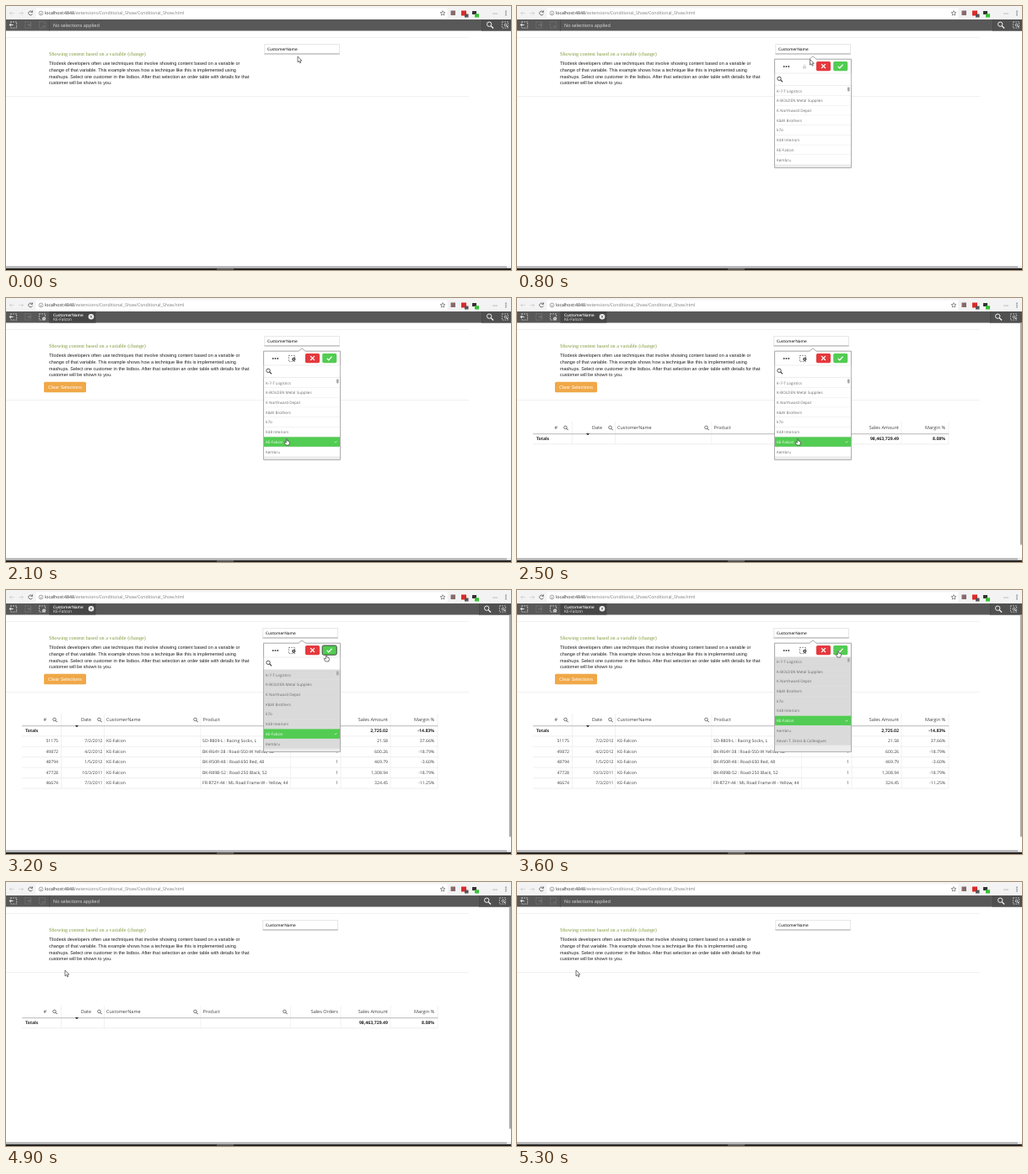
Write an HTML page that moves like this. It is 599 by 314 pixels and loops after 6 s.

```html
<!DOCTYPE html>
<html lang="en">
<head>
<meta charset="utf-8">
<title>Conditional show</title>
<style>
  html, body { margin: 0; width: 100%; height: 100%; overflow: hidden; background: #fff; }
  svg { display: block; width: 100vw; height: 100vh; }
  text { font-family: "Open Sans", "Noto Sans", sans-serif; white-space: pre; text-rendering: geometricPrecision; }
  .arial { font-family: "Liberation Sans", Arial, sans-serif; font-size: 5.47px; }
  .serif { font-family: "Liberation Serif", Georgia, serif; font-size: 6.24px; }
</style>
</head>
<body>
<svg id="stage" viewBox="0 0 599 314" preserveAspectRatio="none"></svg>
<script>
const LOOP = 6000, STEP = 100;
const GREEN = '#52cc52';
const ROW_H = 11.72, LIST_TOP = 95, SCROLL = 15.7;
const PICKED = 6;
const customers = ['K-7-T Logistics', 'K-BOLDEN Metal Supplies', 'K Northward Depot', 'K&amp;W Brothers', 'k7o',
  'K48 Interiors', 'KE-Falcon', 'Kembru', 'Kevan T. Drost &amp; Colleagues'];
const picked = customers[PICKED];
const orders = [
  ['51175', '7/2/2012', 'SO-R809-L : Racing Socks, L', '21.58', '37.66%'],
  ['49872', '4/2/2012', 'BK-R64Y-38 : Road-550-W Yellow, 38', '600.26', '-18.79%'],
  ['48794', '1/5/2012', 'BK-R50R-48 : Road-650 Red, 48', '469.79', '-3.60%'],
  ['47728', '10/3/2011', 'BK-R89B-52 : Road-250 Black, 52', '1,308.94', '-18.79%'],
  ['46674', '7/3/2011', 'FR-R72Y-44 : ML Road Frame-W - Yellow, 44', '324.45', '-11.25%']
];

// Markup helpers
const rect = (x, y, w, h, fill, more = '') => `<rect x="${x}" y="${y}" width="${w}" height="${h}" fill="${fill}" ${more}/>`;
const line = (x1, y1, x2, y2, color, w = .6) => `<path d="M${x1} ${y1}L${x2} ${y2}" stroke="${color}" stroke-width="${w}"/>`;
const stroke = (d, color, w = 1) => `<path d="${d}" fill="none" stroke="${color}" stroke-width="${w}"/>`;
const dot = (x, y, r, fill) => `<circle cx="${x}" cy="${y}" r="${r}" fill="${fill}"/>`;
const text = (x, y, s, size, fill, more = '') => `<text x="${x}" y="${y}" font-size="${size}" fill="${fill}" ${more}>${s}</text>`;
const group = (id, body, more = '') => `<g id="${id}" ${more}>${body}</g>`;
const END = 'text-anchor="end"', BOLD = 'font-weight="700"', SEMI = 'font-weight="600"';
const lens = (x, y, r, color, w = .8) =>
  `<circle cx="${x - r * .3}" cy="${y - r * .3}" r="${r}" fill="none" stroke="${color}" stroke-width="${w}"/>` +
  stroke(`M${x + r * .4} ${y + r * .4}l${r * 1.1} ${r * 1.1}`, color, w * 1.4);
const dashedBox = (x, y, color) =>
  rect(x - 3.6, y - 3.6, 7.2, 7.2, 'none', `stroke="${color}" stroke-width=".8" stroke-dasharray="1.6 1.2"`);
const cross = (x, y, r, color, w) => stroke(`M${x - r} ${y - r}l${2 * r} ${2 * r}m0 ${-2 * r}l${-2 * r} ${2 * r}`, color, w);
const tick = (x, y, s, color, w) => stroke(`M${x - s} ${y}l${s * .7} ${s * .7}l${s * 1.3} ${-s * 1.4}`, color, w);

function browserBar() {
  const arrow = (x, dir) => stroke(`M${x - 2.5} 8.5h5M${x + 2.5 * dir} 8.5l${-2 * dir} -2m${2 * dir} 2l${-2 * dir} 2`, '#c8c8c8', .7);
  return rect(0, 0, 599, 16, '#f3f3f3') + rect(35.5, 2.5, 488, 12, '#fff', 'rx="1"') +
    arrow(7, -1) + arrow(18, 1) +
    stroke('M31 7A2.4 2.4 0 1 0 31.3 9.4M31.4 5.4V7.4H29.4', '#555', .8) +
    `<circle cx="41.5" cy="8.5" r="2.4" fill="none" stroke="#666" stroke-width=".6"/>` + line(41.5, 7.9, 41.5, 10, '#666') +
    text(46, 10.4, 'localhost:4848<tspan fill="#777">/extensions/Conditional_Show/Conditional_Show.html</tspan>', 5.2, '#222') +
    stroke('M518 5.6l.8 2 2.1.1-1.7 1.3.6 2.1-1.8-1.2-1.8 1.2.6-2.1-1.7-1.3 2.1-.1z', '#555', .6) +
    rect(527.5, 5.5, 5.5, 5.5, '#876a6d') + rect(540, 5.5, 6, 6, '#dd2a2a') + rect(544, 9.5, 4.5, 4, '#555') +
    rect(553, 6, 5, 4, '#333') + rect(556, 9.3, 5, 4.2, '#35c435') +
    [578, 580, 582].map(x => dot(x, 9, .6, '#777')).join('') +
    [6.2, 8.5, 10.8].map(y => dot(593, y, .7, '#555')).join('');
}

function toolbar() {
  const backArrow = stroke('M8.5 22.5H4.5M6 20.7l-1.8 1.8 1.8 1.8', '#fff', .9);
  return rect(0, 16, 599, 13.5, '#585858') + dashedBox(9, 22.5, '#ddd') + rect(3, 20, 5, 5, '#585858') + backArrow +
    dashedBox(26, 22.5, '#7c7c7c') + stroke('M25 22.5h4m-1.5-1.7 1.8 1.7-1.8 1.7', '#7c7c7c', .8) +
    line(51.5, 16, 51.5, 29.5, '#484848', .8) +
    group('idleBar', dashedBox(43, 22.5, '#7c7c7c') + cross(44.5, 24, 1.2, '#7c7c7c', .7) +
      text(56, 24.8, 'No selections applied', 5.5, '#e0e0e0')) +
    group('pickBar', dashedBox(43, 22.5, '#ddd') + dot(45, 24.5, 2, '#ddd') + cross(45, 24.5, .8, '#555', .5) +
      rect(52, 16, 54.5, 13.5, '#464646') +
      text(56, 21.6, 'CustomerName', 4.7, '#fff', SEMI) + text(56, 27.1, picked, 4.9, '#e8e8e8') +
      dot(101, 22.3, 3.3, '#eee') + cross(101, 22.3, 1.3, '#444', .7)) +
    group('barRight', rect(564, 16, 38, 13.5, '#505050') + line(564.5, 16, 564.5, 29.5, '#464646') +
      lens(574, 22.5, 2.7, '#fff', .9) + dashedBox(592, 22.5, '#ddd') + lens(593, 23, 1.4, '#fff', .7));
}

function intro() {
  const lines = ['Tilodesk developers often use techniques that involve showing content based on a variable or',
    'change of that variable. This example shows how a technique like this is implemented using',
    'mashups. Select one customer in the listbox. After that selection an order table with details for that',
    'customer will be shown to you.'];
  return line(0, 37.5, 549, 37.5, '#eee', .8) + group('divider', line(0, 107.5, 549, 107.5, '#eee', .8)) +
    '<text class="serif" x="51" y="59" fill="#7f9a3b">Showing content based on a variable (change)</text>' +
    lines.map((s, i) => `<text class="arial" x="51" y="${70 + i * 7.8}" fill="#1c1c1c">${s}</text>`).join('') +
    group('clear', rect(45, 99.7, 50, 12.6, '#f0a848', 'id="clearBox" rx="1.6"') +
      '<text class="arial" x="70" y="107.9" text-anchor="middle" fill="#fff">Clear Selections</text>');
}

function listHeader() {
  return group('listHeader', rect(306.8, 45.4, 88.6, 11.4, '#fff', 'id="listBox" stroke="#ddd" stroke-width=".7"') +
    line(306.5, 57, 395.7, 57, '#aaa', 1) + text(310, 53, 'CustomerName', 4.7, '#333', SEMI));
}

function table() {
  const edges = [65.5, 116.5, 230.8, 337.6, 397, 456, 512];
  const rowLine = y => line(19, y, 512.3, y, '#e4e4e4');
  const head = (x, s, more) => text(x, 156.3, s, 5.5, '#404040', more);
  const cells = ([id, date, product, amount, margin], i) => {
    const y = 181.3 + i * 12.45, cell = (x, s, more) => text(x, y, s, 5.1, '#404040', more);
    return cell(62, id, END) + cell(114.5, date, END) + cell(119, picked) + cell(233, product) +
      cell(394, '1', END) + cell(453, amount, END) + cell(508, margin, END) + rowLine(186.2 + i * 12.45);
  };
  const totals = (...pairs) => pairs.map(([x, s]) => text(x, 169, s, 5.2, '#222', BOLD + ' ' + END)).join('');
  return group('table',
    edges.map(x => line(x, 147, x, 174, '#e8e8e8')).join('') +
    head(48, '#', END) + head(101, 'Date', END) + head(119, 'CustomerName') + head(233.5, 'Product') +
    head(394, 'Sales Orders', END) + head(453, 'Sales Amount', END) + head(508, 'Margin %', END) +
    [58, 111, 225, 331].map(x => lens(x, 154.5, 1.8, '#444', .7)).join('') +
    line(19, 161.7, 512.3, 161.7, '#a5a5a5', .8) + '<path d="M82 161h4l-2 2.2z" fill="#222"/>' +
    text(23, 169, 'Totals', 5.1, '#222', BOLD) + rowLine(173.8) +
    group('allTotals', totals([453, '98,463,729.49'], [508, '8.08%'])) +
    group('rows', edges.map(x => line(x, 174, x, 236, '#e8e8e8')).join('') +
      totals([394, '5'], [453, '2,725.02'], [508, '-14.83%']) + orders.map(cells).join('')));
}

function popover() {
  const row = (name, i) => {
    const y = LIST_TOP + i * ROW_H;
    return rect(306, y, 90, ROW_H, '#fff', 'class="rowBox"') + line(306, y + ROW_H, 396, y + ROW_H, '#d2d2d2', .5) +
      text(308, y + 7.6, name, 4.55, '#6a6a6a', 'class="rowText"');
  };
  return group('popover',
    '<path d="M305.6 63.2H347l4-3.4 4 3.4h41.4V192.4H305.6z" fill="#fff" stroke="#8f8f8f" stroke-width=".8"/>' +
    [316.7, 319.5, 322.3].map(x => dot(x, 72, .95, '#444')).join('') +
    group('lock', rect(339, 71.5, 4, 3, '#d5d5d5') + stroke('M340 71.5v-1a1 1 0 0 1 2 0v1', '#d5d5d5', .6)) +
    group('pickTool', dashedBox(339, 72, '#666') + dot(341.3, 72.8, 2.1, '#444') + dot(341.3, 72.8, .7, '#fff')) +
    rect(355, 66, 17, 11.2, '#e5393d', 'rx="1.6"') + cross(363.5, 71.6, 2.4, '#fff', 1.2) +
    rect(375.2, 66, 17, 11.2, GREEN, 'rx="1.6" id="confirm"') + tick(383.6, 71.8, 2.9, '#fff', 1.2) +
    group('search', rect(306, 80, 90, 14.5, '#fff', 'stroke="#e2e2e2" stroke-width=".6"') + lens(311.7, 87, 2.2, '#444', .9) +
      group('caret', line(318.3, 84, 318.3, 90, '#555', .6))) +
    rect(306, 188.8, 90, 3.2, '#ebebeb') +
    `<g clip-path="url(#listClip)">${group('list', customers.map(row).join('') + rect(306, LIST_TOP + 9 * ROW_H, 90, 9, '#ebebeb') +
      group('rowTick', tick(391, LIST_TOP + (PICKED + .5) * ROW_H, 1.2, '#fff', .7)) +
      rect(392, 96.5, 2.6, 5, '#aaa', 'rx=".8"'))}</g>`);
}

const pointers = group('arrow', '<path d="M0 0V6.8L1.6 5.4 2.7 7.8 3.8 7.3 2.8 5H4.8z" fill="#fff" stroke="#222" stroke-width=".6"/>') +
  group('hand', '<path d="M-.7 .6Q0-.4.7.6V3L3 3.6Q3.6 4 3.4 5L2.8 8H-1L-2.9 5Q-2.8 3.9-1.6 4.6L-.7 5.2z" fill="#fff" stroke="#222" stroke-width=".6"/>');

const stage = document.getElementById('stage');
stage.innerHTML = `<clipPath id="listClip">${rect(305.9, 79.2, 90.2, 109.6, '#000')}</clipPath>` +
  rect(0, 0, 599, 314, '#fff') + browserBar() + toolbar() + intro() + table() + listHeader() + popover() +
  group('sideScroll', rect(596.8, 29.5, 2.2, 264, '#a9a9a9')) +
  rect(0, 309, 599, 2.5, '#f0f0f0') + rect(0, 309.6, 594, 1.6, '#a8a8a8') +
  rect(0, 311.8, 599, 2.2, '#242424') + rect(250, 312, 20, 2, '#555') + pointers;

const $ = id => document.getElementById(id);
const rowBoxes = stage.querySelectorAll('.rowBox'), rowTexts = stage.querySelectorAll('.rowText');
const show = (id, on) => $(id).setAttribute('display', on ? 'inline' : 'none');
const shift = (id, x, y) => $(id).setAttribute('transform', `translate(${x} ${y})`);

// Pointer path: time, x, y
const path = [[0, 346, 60], [300, 349, 50], [700, 349, 50], [1300, 340, 130], [1400, 340, 132], [1700, 333, 167],
  [2500, 333, 167], [3200, 380, 77], [3600, 381, 72], [3900, 379, 72], [4000, 350, 76], [4100, 270, 86],
  [4200, 185, 98], [4300, 123, 104], [4600, 70, 105], [LOOP, 70, 105]];

function pointerAt(t) {
  const i = path.findIndex(p => p[0] > t), [t0, x0, y0] = path[i - 1], [t1, x1, y1] = path[i];
  const k = (t - t0) / (t1 - t0);
  return [x0 + (x1 - x0) * k, y0 + (y1 - y0) * k];
}

function draw(t) {
  const within = (from, to) => t >= from && t < to;
  const filtered = within(2000, 4900), tableOn = within(2200, 5000);
  const chosen = within(1900, 4900), greyed = within(2700, 4900), scrolled = t >= 3400;

  show('idleBar', !filtered);
  show('pickBar', filtered);
  show('clear', filtered);
  show('table', tableOn);
  show('rows', within(2700, 4900));
  show('allTotals', !within(2700, 4900));
  show('sideScroll', tableOn);
  shift('barRight', tableOn ? -3 : 0, 0);
  shift('listHeader', tableOn ? -2 : 0, 0);
  shift('divider', 0, filtered ? 14 : 0);
  $('listBox').setAttribute('fill', within(200, 800) ? '#f4f4f4' : '#fff');
  $('clearBox').setAttribute('fill', within(4500, 4900) ? '#ec971f' : '#f0a848');

  show('popover', within(700, 3700));
  show('list', t >= 800);
  show('lock', !chosen);
  show('pickTool', chosen);
  show('search', !scrolled);
  show('caret', within(900, 1500));
  show('rowTick', chosen);
  shift('list', 0, scrolled ? -SCROLL : 0);
  rowBoxes.forEach((box, i) => {
    const on = chosen && i === PICKED;
    box.setAttribute('fill', on ? GREEN : greyed ? '#dadada' : '#fff');
    rowTexts[i].setAttribute('fill', on ? '#fff' : '#6a6a6a');
  });
  $('confirm').setAttribute('stroke', within(3100, 3400) ? '#444' : 'none');

  const [x, y] = pointerAt(t);
  const hand = within(200, 800) || within(1700, 2700) || within(3100, 3700) || within(4500, 4900);
  show('hand', hand);
  show('arrow', !hand);
  shift(hand ? 'hand' : 'arrow', x, y);
}

const start = performance.now();
function tickFrame() {
  const t = (performance.now() - start) % LOOP;
  draw(Math.floor(t / STEP) * STEP);
  requestAnimationFrame(tickFrame);
}
tickFrame();
</script>
</body>
</html>
```
